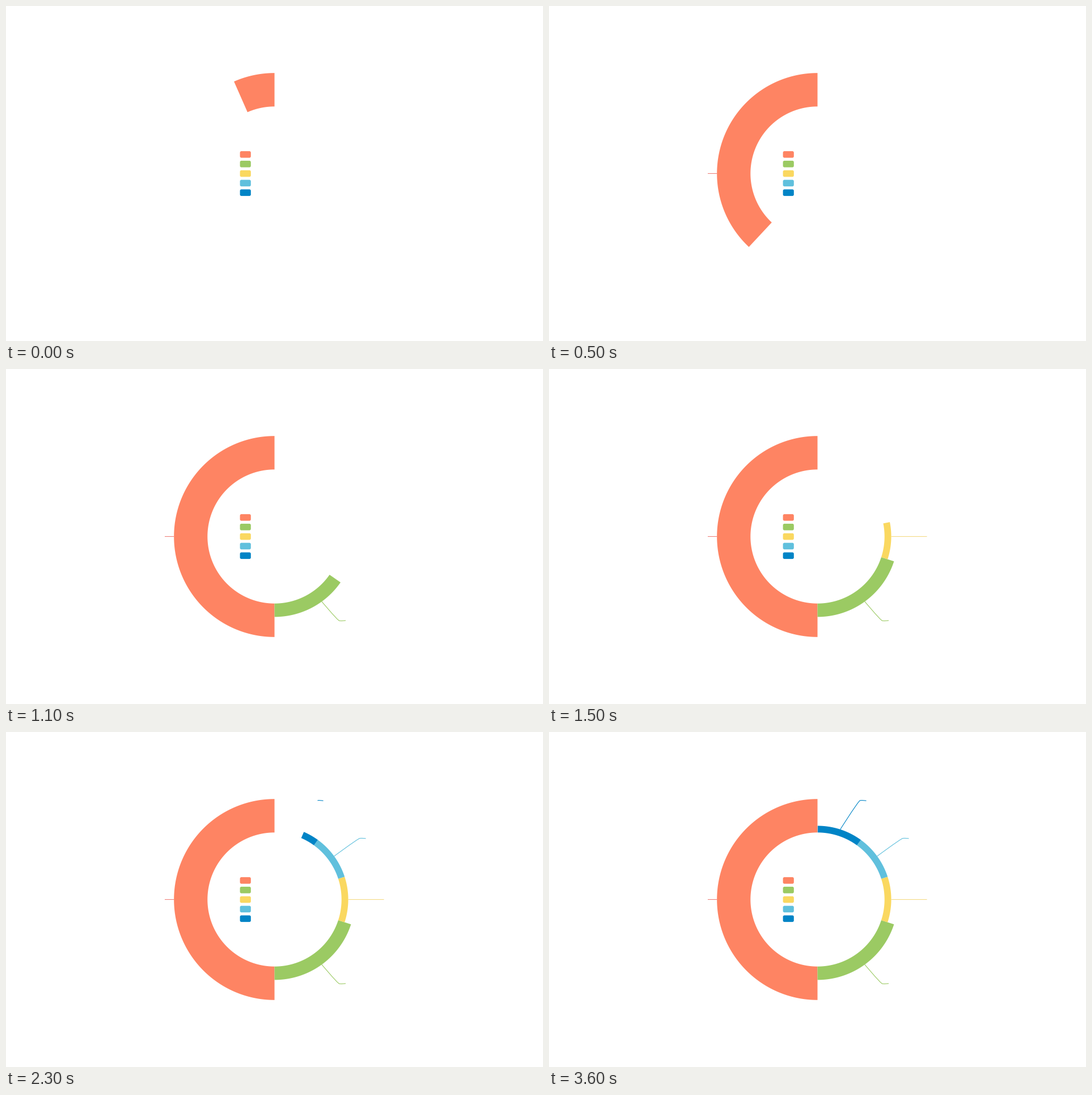
Animation, 947 px wide and 591 px high, one loop 4000 ms. Source, as a matplotlib script:

```python
import numpy as np
import matplotlib.pyplot as plt
from matplotlib.animation import FuncAnimation
from matplotlib.patches import FancyBboxPatch, PathPatch, Polygon
from matplotlib.path import Path

W, H, DPI = 947, 591, 64
PX = 72 / DPI                       # one pixel in points
FRAMES, INTERVAL, LAST = 40, 100, 36
CX, CY = W / 2, H / 2
R_IN, R_OUT = 0.2 * H, 0.3 * H

VALUES = [5, 2, 1, 1, 1]
COLORS = ["#FE8463", "#9BCA63", "#FAD860", "#60C0DD", "#0084C6"]
LINE_COLORS = ["#EE8079", "#9BCA63", "#F3DA85", "#60C0DD", "#0084C6"]
# Bend and end of each label line; straight lines have only an end.
LINE_ENDS = [
    [(280, CY)],
    [(587, 443.7), (599, 443.7)],
    [(666.5, CY)],
    [(623, 187.9), (634.5, 187.9)],
    [(547.8, 121.3), (559.5, 121.3)],
]
SMOOTH = 0.2


def polar(r, deg):
    """Points at counterclockwise angles measured from twelve o'clock."""
    a = np.radians(deg)
    return np.column_stack([CX - r * np.sin(a), CY - r * np.cos(a)])


def sector(r0, r1, a0, a1):
    a = np.linspace(a0, a1, max(2, int(abs(a1 - a0) * 2) + 2))
    return np.vstack([polar(r1, a), polar(r0, a[::-1])])


def label_path(start, ends):
    """Straight line, or a two-part curve softened at the bend."""
    p0 = np.asarray(start)
    if len(ends) == 1:
        return Path([p0, ends[0]])
    p1, p2 = np.array(ends)
    d0, d1 = np.hypot(*(p1 - p0)), np.hypot(*(p2 - p1))
    v = (p2 - p0) * SMOOTH / (d0 + d1)
    points = [p0, p0, p1 - v * d0, p1, p1 + v * d1, p2, p2]
    return Path(points, [Path.MOVETO] + [Path.CURVE4] * 6)


def sweep_at(frame):
    p = (min(frame, LAST) + 0.9) / FRAMES
    return 360 * (1 - (1 - p) ** 3)


fig = plt.figure(figsize=(W / DPI, H / DPI), dpi=DPI, facecolor="white")
ax = fig.add_axes([0, 0, 1, 1])
ax.set_xlim(0, W)
ax.set_ylim(H, 0)
ax.axis("off")

bounds = np.concatenate([[0], np.cumsum(VALUES)]) * 360 / sum(VALUES)
radii = [R_IN + (R_OUT - R_IN) * v / max(VALUES) for v in VALUES]

slices, lines = [], []
for i, color in enumerate(COLORS):
    a0, a1, r = bounds[i], bounds[i + 1], radii[i]
    shape = Polygon(sector(R_IN, r, a0, a1), closed=True, fc=color, lw=0,
                    snap=False)
    slices.append(ax.add_patch(shape))

    start = polar(r, np.array([(a0 + a1) / 2]))[0]
    line = PathPatch(label_path(start, LINE_ENDS[i]), fill=False,
                     ec=LINE_COLORS[i], lw=1.1 * PX, capstyle="butt",
                     snap=False)
    lines.append(ax.add_patch(line))

    ax.add_patch(FancyBboxPatch(
        (412.6, 256.1 + 16.85 * i), 19.2, 11.6,
        boxstyle="round,pad=0,rounding_size=2.6", fc=color, lw=0, snap=False))


def update(frame):
    sweep = sweep_at(frame)
    clip = Path(sector(0, W, 0, sweep))
    for i, (shape, line) in enumerate(zip(slices, lines)):
        a0, a1 = bounds[i], min(bounds[i + 1], sweep)
        shape.set_visible(a1 > a0)
        if a1 > a0:
            shape.set_xy(sector(R_IN, radii[i], a0, a1))
        line.set_clip_path(clip, ax.transData)
    return slices + lines


anim = FuncAnimation(fig, update, frames=FRAMES, interval=INTERVAL,
                     repeat=True, repeat_delay=0, blit=False)
plt.show()
```
